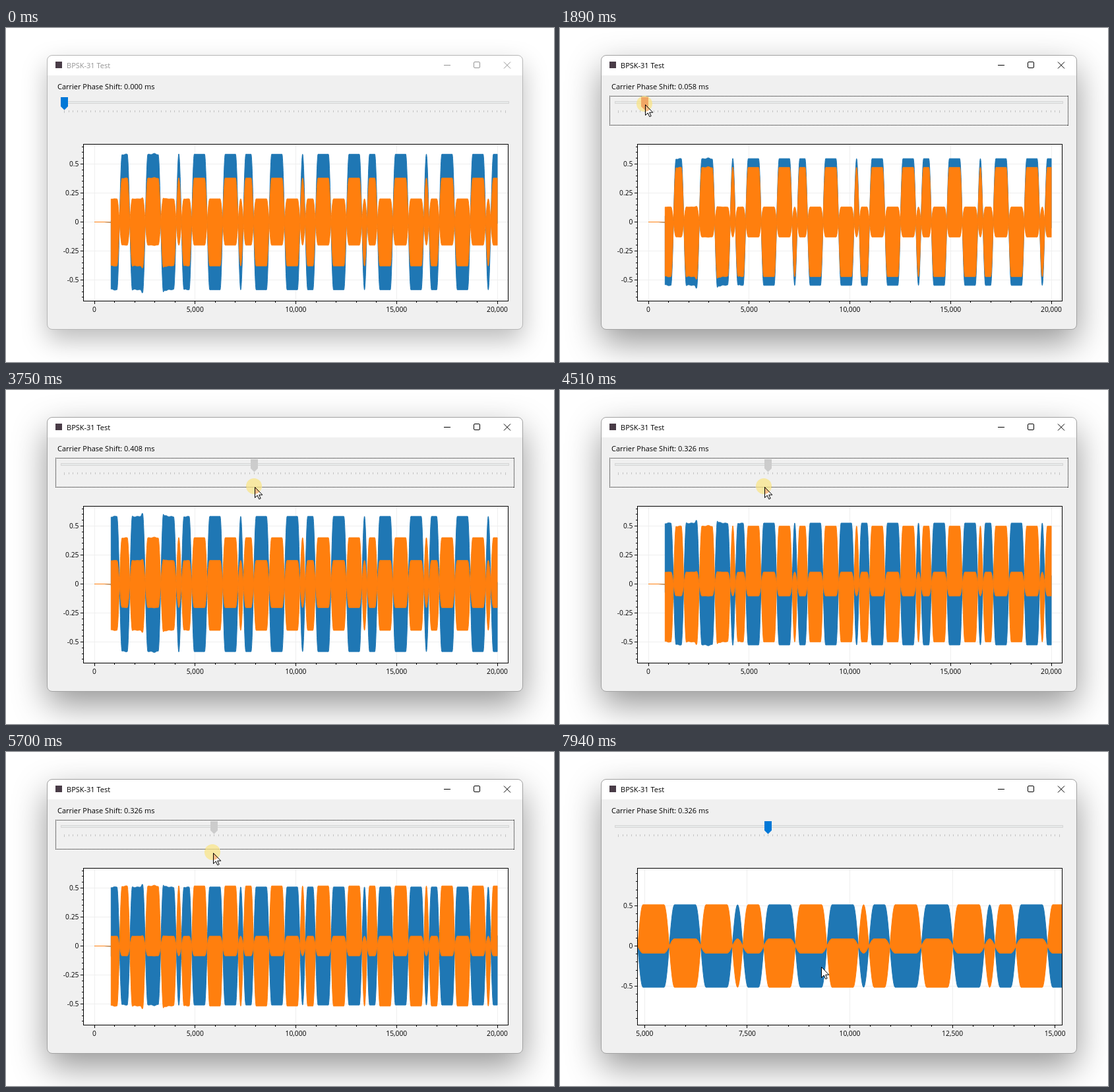
An HTML page with a canvas that plays this animation: 831x507 px, repeating every 8000 ms.

```html
<!DOCTYPE html>
<html lang="en">
<head>
<meta charset="utf-8">
<title>BPSK-31 Test</title>
<style>
html, body { margin: 0; width: 100%; height: 100%; overflow: hidden; background: #fff; }
canvas { display: block; }
</style>
</head>
<body>
<canvas id="stage" width="831" height="507"></canvas>
<script>
const ctx = document.getElementById('stage').getContext('2d');
const FONT = '"Open Sans", "Noto Sans", sans-serif';
const BLUE = '#1f77b4', ORANGE = '#ff7f0e';
const LOOP = 8000, SHOW = 530, PRESS = 1550, RELEASE = 6510, LEAVE = 6900, GRAB = 7340;
const PLOT = { x: 117, y: 176, w: 644, h: 238, cx: 439.5, zero: 294.5 };

// time, pointer x, pointer y, phase shift in ms
const KEYS = [
  [SHOW, 422, 410, 0], [1100, 110, 90, 0], [1280, 89, 114, 0], [PRESS, 89, 114, 0],
  [1822, 121, 115, .046], [1890, 129, 116, .058], [2842, 281, 139, .2665],
  [2910, 289.5, 141, .278], [3800, 385, 148, .42], [3960, 380, 148, .42],
  [4406, 320, 147, .336], [4474, 310, 147, .326], [5000, 252, 150, .238],
  [5630, 311, 153, .323], [5698, 314, 153, .326], [5900, 325, 154, .34],
  [6110, 317, 154, .329], [6430, 317, 154, .329], [6490, 314, 153, .326],
  [LEAVE, 314, 153, .326], [7177, 185, 281, .326], [GRAB, 108, 281, .326],
  [7939, 396, 326, .326]
];

function pose(t) {
  if (t <= KEYS[0][0]) return KEYS[0];
  const i = KEYS.findIndex(k => k[0] >= t);
  if (i < 0) return KEYS[KEYS.length - 1];
  const a = KEYS[i - 1], b = KEYS[i], f = (t - a[0]) / (b[0] - a[0]);
  return a.map((v, n) => v + (b[n] - v) * f);
}

function snap(t) {
  const from = t < LEAVE ? SHOW : LEAVE, step = t < LEAVE ? 68 : 69.3;
  return t < SHOW ? 0 : from + Math.floor((t - from) / step) * step;
}

// Signed BPSK envelope at a sample; runs of 2, 3, 3, 3, 1 symbols repeat
const SYMBOL = 256, START = 1248, BOUNDS = [0, 2, 5, 8, 11, 12];
function envelope(s) {
  const shape = d => d >= .5 ? 1 : Math.sin(Math.PI * d);
  const rel = (s - START) / SYMBOL;
  if (rel < 0) return -shape(-rel);
  const n = Math.floor(rel / 12), p = rel - n * 12;
  const i = BOUNDS.findIndex(b => b > p) - 1;
  const e = shape(Math.min(p - BOUNDS[i], BOUNDS[i + 1] - p));
  return (i + n) % 2 ? -e : e;
}

function ripple(s) {
  if (s > 4600) return 1;
  const spike = at => .035 * Math.exp(-(((s - at) / 45) ** 2));
  return 1 + .012 * Math.sin(s / 61) * Math.sin(s / 173) + spike(2380) + spike(3420);
}

function drawSignal(color, phase, amp, px, py) {
  const c = Math.cos(phase * Math.PI / 180), up = amp * (1 + c), down = amp * (1 - c);
  const top = [], bottom = [];
  for (let s = 830; s <= 20000; s += 10) {
    const e = envelope(s) * ripple(s), x = px(s);
    top.push([x, py(e > 0 ? e * up : -e * down)]);
    bottom.push([x, py(e > 0 ? -e * down : e * up)]);
  }
  ctx.fillStyle = ctx.strokeStyle = color;
  ctx.lineWidth = 1;
  ctx.lineJoin = 'round';
  ctx.beginPath();
  ctx.moveTo(px(0), py(0));
  ctx.lineTo(px(500), py(0));
  ctx.lineTo(px(830), py(-.003));
  ctx.stroke();
  ctx.beginPath();
  top.concat(bottom.reverse()).forEach(p => ctx.lineTo(p[0], p[1]));
  ctx.closePath();
  ctx.fill();
  ctx.stroke();
}

function rect(color, x, y, w, h) {
  ctx.fillStyle = color;
  ctx.fillRect(x, y, w, h);
}

function text(str, x, y, size, color = '#000', align = 'left') {
  ctx.font = size + 'px ' + FONT;
  ctx.fillStyle = color;
  ctx.textAlign = align;
  ctx.fillText(str, x, y);
}

function line(color, x1, y1, x2, y2) {
  ctx.strokeStyle = color;
  ctx.lineWidth = 1;
  ctx.beginPath();
  ctx.moveTo(x1, y1);
  ctx.lineTo(x2, y2);
  ctx.stroke();
}

function polygon(x, y, pts) {
  ctx.beginPath();
  for (let i = 0; i < pts.length; i += 2) ctx.lineTo(x + pts[i], y + pts[i + 1]);
  ctx.closePath();
}

function drawWindow(active) {
  rect('#fff', 0, 0, 831, 507);
  const frame = () => {
    ctx.beginPath();
    ctx.roundRect(62.5, 41.5, 721, 416, 7.5);
  };
  ctx.save();
  ctx.shadowColor = active ? 'rgba(0,0,0,.42)' : 'rgba(0,0,0,.27)';
  ctx.shadowBlur = active ? 52 : 38;
  ctx.shadowOffsetY = active ? 20 : 16;
  ctx.fillStyle = '#f0f0f0';
  frame();
  ctx.fill();
  ctx.restore();
  ctx.save();
  frame();
  ctx.clip();
  rect('#f0f0f0', 62, 41, 722, 417);
  rect('#fff', 62, 41, 722, 31);
  ctx.restore();
  ctx.strokeStyle = active ? '#a2a2a2' : '#b6b6b6';
  ctx.lineWidth = 1;
  frame();
  ctx.stroke();

  const ink = active ? '#000' : '#949494';
  rect('#493c47', 75, 51, 10, 10);
  text('BPSK-31 Test', 92, 61, 11, ink);
  line(ink, 664, 56.5, 674, 56.5);
  line(ink, 755, 51.5, 765, 61.5);
  line(ink, 765, 51.5, 755, 61.5);
  ctx.beginPath();
  ctx.roundRect(709.5, 51.5, 9, 9, 1.5);
  ctx.stroke();
}

function drawThumb(x, color) {
  ctx.fillStyle = color;
  polygon(Math.round(x), 105, [-5, 0, 6, 0, 6, 14, .5, 19.5, -5, 14]);
  ctx.fill();
}

function drawSlider(thumb, shift, color, focus) {
  text('Carrier Phase Shift: ' + shift.toFixed(3) + ' ms', 78, 93, 11);
  rect('#d6d6d6', 83, 111, 680, 4);
  rect('#e7eaea', 84, 112, 678, 2);
  for (let i = 0; i <= 100; i++) {
    rect('#c4c4c4', Math.round(88 + i * 6.69), 125, 1, i % 100 ? 3 : 4);
  }
  drawThumb(thumb, color);
  if (focus) {
    ctx.setLineDash([1, 1]);
    for (const y of [103.5, 147.5]) line('#000', 75, y, 771, y);
    for (const x of [75.5, 770.5]) line('#000', x, 103, x, 148);
    ctx.setLineDash([]);
  }
}

// Calls fn(value, isMajor) for five minor divisions per major step
function eachTick(step, limit, fn) {
  const n = Math.ceil(limit / step * 5);
  for (let i = -n; i <= n; i++) fn(i * step / 5, i % 5 === 0);
}

function drawPlot(shift, zx, zy) {
  const sx = .03055 * zx, sy = 176 * zy;
  const px = s => PLOT.cx + (s - 10000) * sx;
  const py = v => PLOT.zero - v * sy;
  const { x, y, w, h } = PLOT, right = x + w, bottom = y + h;
  const stepX = sx > .045 ? 2500 : 5000, stepY = sy < 140 ? .5 : .25;
  const seenX = v => px(v) >= x && px(v) <= right;
  const seenY = v => py(v) >= y && py(v) <= bottom;

  rect('#fff', x, y, w, h);
  eachTick(stepX, 25000, (v, major) => {
    if (major && seenX(v)) rect('#efefef', Math.floor(px(v)), y, 1, h);
  });
  eachTick(stepY, 2, (v, major) => {
    if (major && seenY(v)) rect('#efefef', x, Math.floor(py(v)), w, 1);
  });

  ctx.save();
  ctx.beginPath();
  ctx.rect(x, y, w, h);
  ctx.clip();
  drawSignal(BLUE, 18 + 360 * shift, .3, px, py);
  drawSignal(ORANGE, 72 - 360 * shift, .29 + .012 * Math.min(1, shift / .05), px, py);
  ctx.restore();

  ctx.strokeStyle = '#000';
  ctx.lineWidth = 1;
  ctx.strokeRect(x + .5, y + .5, w, h);
  eachTick(stepX, 25000, (v, major) => {
    if (!seenX(v)) return;
    rect('#000', Math.floor(px(v)), bottom, 1, major ? 5 : 3);
    if (major) text(v.toLocaleString('en-US'), px(v), 431, 10.3, '#000', 'center');
  });
  eachTick(stepY, 2, (v, major) => {
    if (!seenY(v)) return;
    const len = major ? 4 : 2;
    rect('#000', x - len, Math.floor(py(v)), len, 1);
    if (major) text(String(v), 110.5, py(v) + 3.5, 10.3, '#000', 'right');
  });
}

const ARROW = [.5, .5, .5, 16.5, 4.2, 13, 6.8, 18.6, 9.2, 17.6, 6.7, 12.2, 11.8, 12.2];
function drawPointer(x, y, thumb, pressed) {
  const arrow = () => polygon(x, y, ARROW);
  const halo = () => {
    ctx.beginPath();
    ctx.arc(x - 1, y - 1, 12, 0, 7);
  };
  const inHalo = paint => {
    ctx.save();
    halo();
    ctx.clip();
    paint();
    ctx.restore();
  };
  const fillArrow = color => {
    ctx.fillStyle = color;
    arrow();
    ctx.fill();
  };
  if (pressed) {
    ctx.fillStyle = 'rgba(250,228,130,.7)';
    halo();
    ctx.fill();
    inHalo(() => drawThumb(thumb, '#f0a765'));
  }
  fillArrow('#fff');
  if (pressed) inHalo(() => fillArrow('#f8bd88'));
  ctx.strokeStyle = '#000';
  ctx.lineWidth = 1;
  ctx.lineJoin = 'miter';
  arrow();
  ctx.stroke();
}

// Drag zoom around the plot centre: right zooms in, down zooms out
const zoom = (d, size) => 10 ** (d / (Math.abs(d) + size));

function draw(t) {
  const [, x, y, shift] = pose(t);
  const pressed = t >= PRESS && t < RELEASE, dragging = t >= GRAB;
  const rest = 88 + shift * 696.3;
  const thumb = pressed ? Math.max(rest, x - 1) : rest;
  const hover = t >= SHOW && Math.abs(x - thumb) < 7 && y > 104 && y < 125;
  drawWindow(t >= PRESS);
  drawSlider(thumb, shift, pressed ? '#ccc' : hover ? '#171717' : '#0078d7',
    t >= PRESS && !dragging);
  // The plot redraws one step behind the slider
  drawPlot(pose(t - 68)[3], dragging ? zoom(x - 108, PLOT.w) : 1,
    dragging ? zoom(281 - y, PLOT.h) : 1);
  if (t >= SHOW) drawPointer(Math.round(x), Math.round(y), thumb, pressed);
}

let shown = -1;
const begin = performance.now();
function tick() {
  const t = snap((performance.now() - begin) % LOOP);
  if (t !== shown) draw(shown = t);
  requestAnimationFrame(tick);
}
tick();
</script>
</body>
</html>
```
